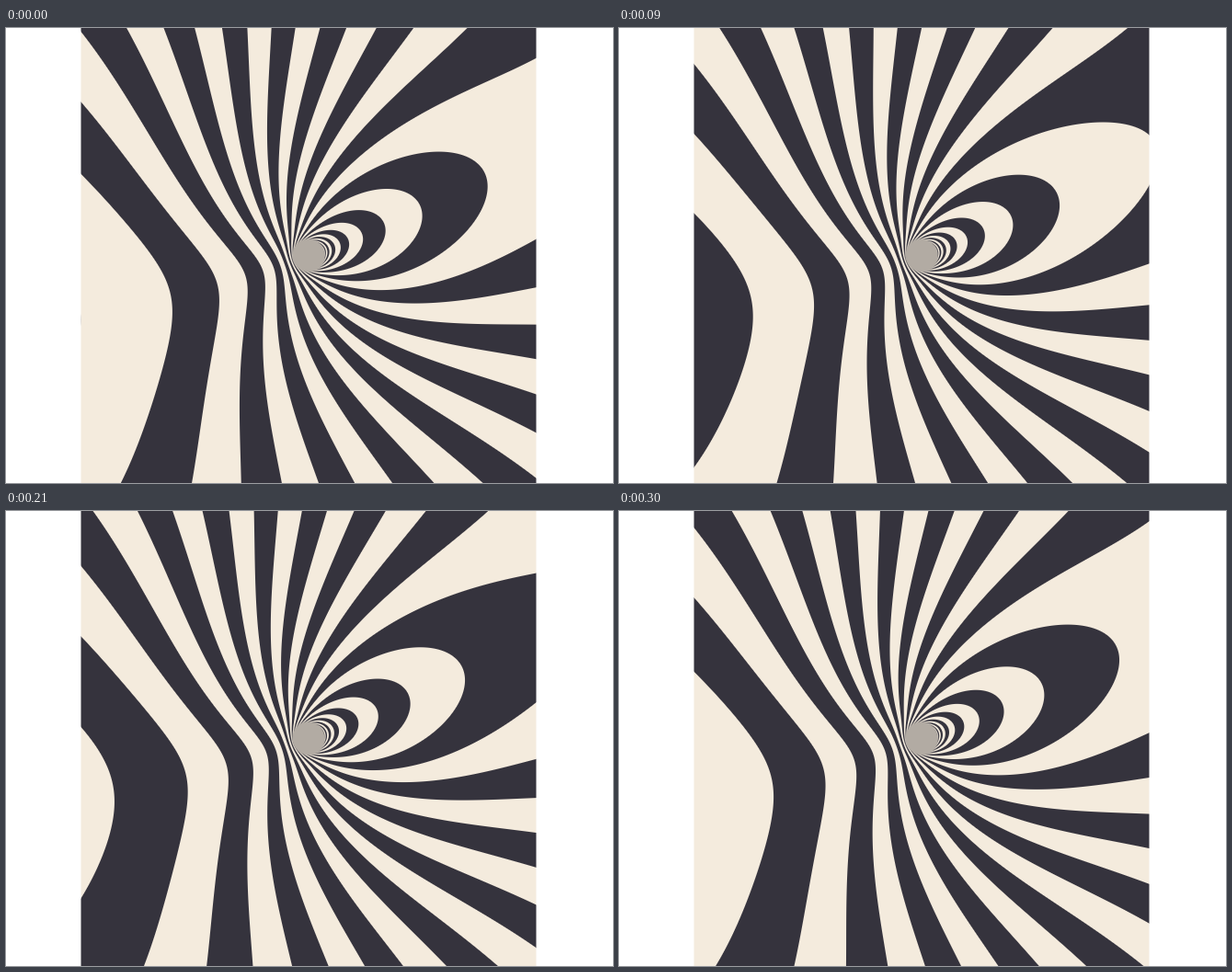
Write an HTML page with a canvas that moves like this. It is 660 by 495 pixels and loops after 330 ms.

```html
<!DOCTYPE html>
<html lang="en">
<head>
<meta charset="utf-8">
<title>Striped vortex</title>
<style>
  html, body { margin: 0; width: 100%; height: 100%; overflow: hidden; background: #fff; }
  canvas { position: absolute; left: 81px; top: 0; display: block; }
</style>
</head>
<body>
<canvas id="stage" width="496" height="495"></canvas>
<script>
const W = 496, H = 495, STEP = 30, STEPS = 11;
const DARK = [53, 51, 61], CREAM = [244, 235, 221], CORE = [178, 171, 163];
const AXIS = 0.359, SQUEEZE = 0.68;

const ctx = document.getElementById('stage').getContext('2d');
const img = ctx.createImageData(W, H);
const clamp = v => Math.max(0, Math.min(1, v));

// Stripe number at a point relative to the vortex centre (y up).
// Whole numbers are stripe edges; odd-numbered stripes are dark.
function stripe(x, y) {
  const r = Math.hypot(x, y) || 1e-3, a = Math.atan2(y, x);
  const depth = 2.475 * Math.log(r) - Math.pow(35 / r, 2.5) - 0.45 * Math.pow(r / 250, 2.2);
  const turn = 6.75 + 8.286 * Math.cos(a - AXIS);
  const squeeze = 1.89 * Math.tanh(r / 220) * Math.sin(a - SQUEEZE) ** 2;
  return depth - turn + squeeze;
}

// Static per-pixel data: stripe number, edge sharpness, weight of the grey core.
const num = new Float32Array(W * H);
const sharp = new Float32Array(W * H);
const core = new Float32Array(W * H);

for (let j = 0, i = 0; j < H; j++) {
  for (let k = 0; k < W; k++, i++) {
    const x = k + 0.5 - W / 2, y = H / 2 - j - 0.5, e = 0.25;
    num[i] = stripe(x, y);
    const gx = (stripe(x + e, y) - stripe(x - e, y)) / (2 * e);
    const gy = (stripe(x, y + e) - stripe(x, y - e)) / (2 * e);
    const slope = Math.hypot(gx, gy);
    sharp[i] = 1 / Math.max(slope, 1e-4);
    core[i] = Math.hypot(x, y) < 12 ? 1 : clamp((slope - 0.7) / 0.4);
  }
}

function draw(shift) {
  const px = img.data;
  for (let i = 0, p = 0; i < num.length; i++, p += 4) {
    const u = num[i] + shift;
    const f = u - 2 * Math.floor(u / 2);
    const edge = f < 1 ? Math.min(f, 1 - f) : -Math.min(f - 1, 2 - f);
    const light = clamp(0.5 + edge * sharp[i]);
    for (let c = 0; c < 3; c++) {
      const v = DARK[c] + (CREAM[c] - DARK[c]) * light;
      px[p + c] = v + (CORE[c] - v) * core[i];
    }
    const k = i % W;
    px[p + 3] = k === 0 || k === W - 1 ? 128 : 255;   // sides fall on half pixels
  }
  ctx.putImageData(img, 0, 0);
}

const start = performance.now();
let last = 0;
draw(0);

function tick() {
  const step = Math.floor((performance.now() - start) / STEP) % STEPS;
  if (step !== last) {
    last = step;
    draw(2 * step / STEPS);
  }
  requestAnimationFrame(tick);
}
requestAnimationFrame(tick);
</script>
</body>
</html>
```
